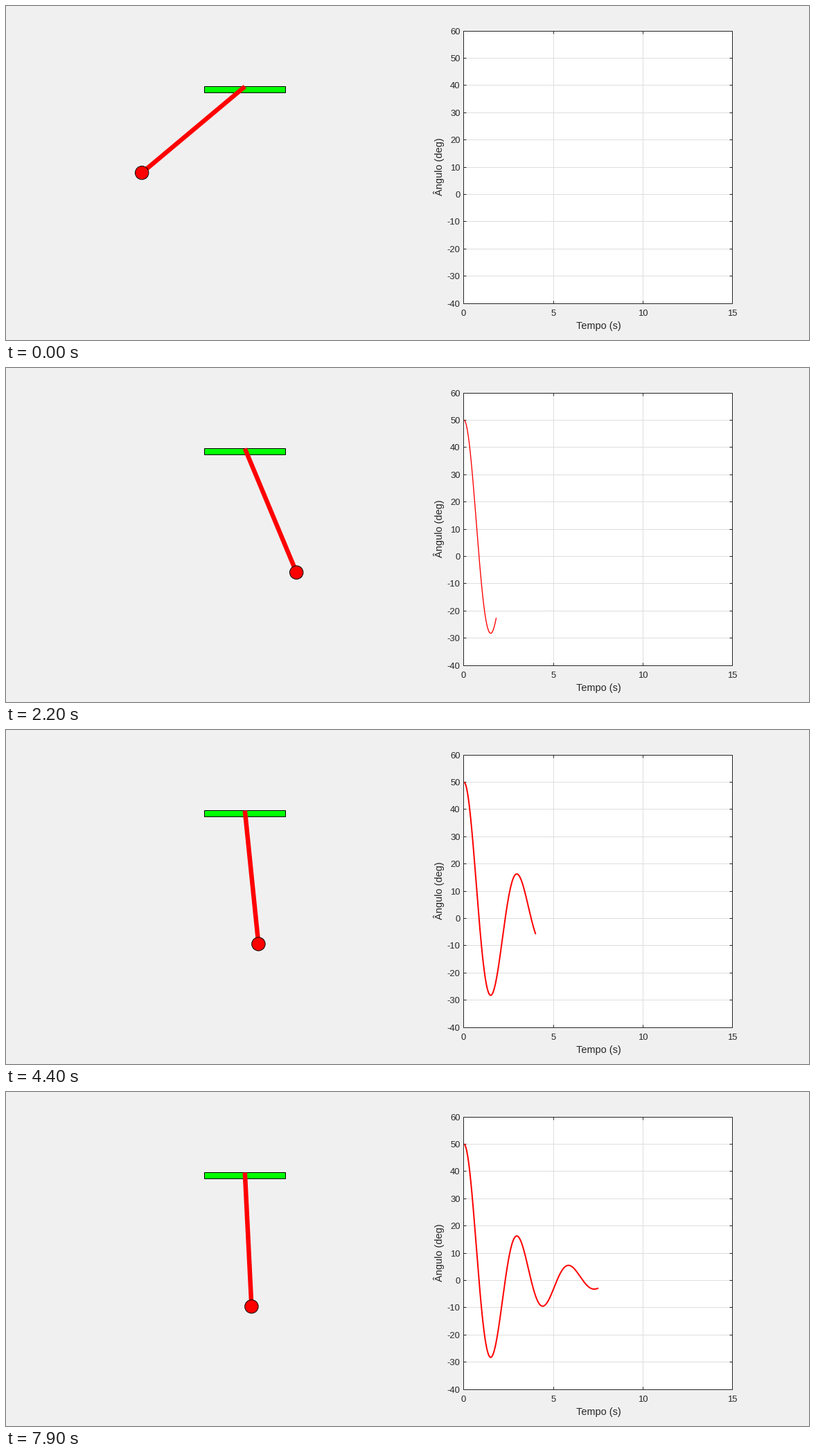
These frames come from a looping animation (1159 by 483 pixels, 8000 ms). A matplotlib script:

```python
import math

import matplotlib.pyplot as plt
import numpy as np
from matplotlib.animation import FuncAnimation
from matplotlib.patches import Circle, Rectangle

W, H, DPI = 1159, 483, 64
FRAMES, INTERVAL = 80, 100
HOLD = 4            # frames at rest before the release
SOLID_FROM = 27     # the trace is drawn heavier from here on

G, LENGTH, DAMPING, START = 9.81, 2.0, 0.75, 50.0
DT = 0.01
PIVOT, SCALE = (344.8, 116.5), 97.0

LEFT, TOP, PLOT_W, PLOT_H = 660.7, 36.0, 388.0, 394.0
INK, GRID = "#262626", "#dedede"


def pt(px):
    return px * 72 / DPI


def accel(state):
    angle, speed = state
    return np.array([speed, -G / LENGTH * math.sin(angle) - DAMPING * speed])


def simulate(steps):
    """Damped pendulum angles in degrees, by Runge-Kutta."""
    state = np.array([math.radians(START), 0.0])
    angles = [state[0]]
    for _ in range(steps):
        a = accel(state)
        b = accel(state + DT / 2 * a)
        c = accel(state + DT / 2 * b)
        d = accel(state + DT * c)
        state = state + DT / 6 * (a + 2 * b + 2 * c + d)
        angles.append(state[0])
    return np.degrees(angles)


def plot_x(t):
    return LEFT + 0.3 + PLOT_W * t / 15


def plot_y(deg):
    return TOP + PLOT_H * (60 - deg) / 100


fig = plt.figure(figsize=(W / DPI, H / DPI), dpi=DPI, facecolor="#f0f0f0")
ax = fig.add_axes([0, 0, 1, 1])
ax.set_xlim(0, W)
ax.set_ylim(H, 0)
ax.axis("off")


def stroke(xs, ys, color, width=1.0, z=2, cap="butt"):
    # Coordinates already sit on pixel centres, so snapping is off.
    return ax.plot(xs, ys, color=color, lw=pt(width), zorder=z, snap=False,
                   solid_capstyle=cap, solid_joinstyle="round")[0]


def label(x, y, text, size, ha="center", **kw):
    ax.text(x, y, text, fontsize=pt(size), family="Liberation Sans",
            color=INK, ha=ha, va="baseline", **kw)


def draw_chart():
    cols = [math.floor(LEFT + PLOT_W * k / 3) + 0.5 for k in range(4)]
    rows = [math.floor(TOP + PLOT_H * k / 10) + 0.5 for k in range(11)]
    x0, x1, y0, y1 = cols[0], cols[-1], rows[0], rows[-1]
    ax.add_patch(Rectangle((x0, y0), x1 - x0, y1 - y0, fc="white",
                           ec="none", snap=False, zorder=1))
    for k, x in enumerate(cols):
        if 0 < k < 3:
            stroke([x, x], [y0, y1], GRID)
        stroke([x, x], [y0, y0 + 4], INK, z=3)
        stroke([x, x], [y1 - 4, y1], INK, z=3)
        label(x, 448, str(5 * k), 13)
    for k, y in enumerate(rows):
        if 0 < k < 10:
            stroke([x0, x1], [y, y], GRID)
        stroke([x0, x0 + 4], [y, y], INK, z=3)
        stroke([x1 - 4, x1], [y, y], INK, z=3)
        label(655.5, y + 4.5, str(60 - 10 * k), 13, ha="right")
    stroke([x0, x1, x1, x0, x0], [y0, y0, y1, y1, y0], INK, z=3,
           cap="projecting")
    label(855, 467, "Tempo (s)", 14.5)
    label(630, 232, "Ângulo (deg)", 14.5, rotation=90, rotation_mode="anchor")


draw_chart()
ax.add_patch(Rectangle((286.5, 116.5), 117, 9, fc="#00ff00", ec="black",
                       lw=pt(1), snap=False, zorder=4))
rod = stroke([], [], "#ff0000", 6.5, z=5)
bob = ax.add_patch(Circle(PIVOT, 0.1 * SCALE, fc="#ff0000", ec="black",
                          lw=pt(1), zorder=6))
trace = stroke([], [], "#ff0000", 2, z=4)

angles = simulate((FRAMES - 1 - HOLD) * 10)
times = np.arange(len(angles)) * DT


def update(frame):
    step = max(0, frame - HOLD) * 10
    theta = math.radians(angles[step])
    x = PIVOT[0] - LENGTH * SCALE * math.sin(theta)
    y = PIVOT[1] + LENGTH * SCALE * math.cos(theta)
    rod.set_data([PIVOT[0], x], [PIVOT[1], y])
    bob.center = (x, y)
    count = step + 1 if step else 0
    trace.set_data(plot_x(times[:count]), plot_y(angles[:count]))
    trace.set_linewidth(pt(2 if frame >= SOLID_FROM else 1.35))
    return rod, bob, trace


def reset():
    return update(0)


anim = FuncAnimation(fig, update, frames=FRAMES, init_func=reset,
                     interval=INTERVAL, repeat=True, repeat_delay=0)
plt.show()
```
